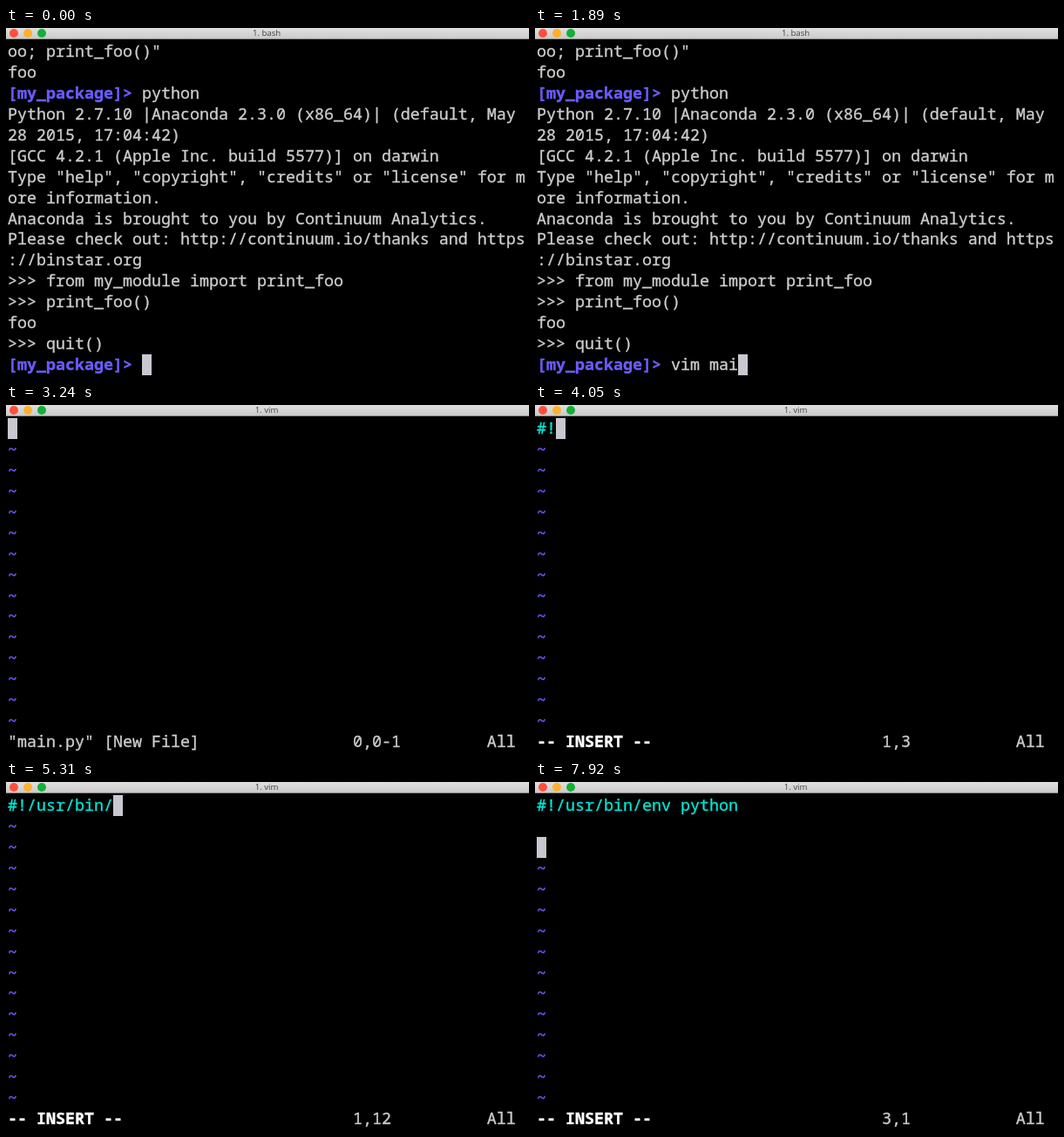
Animation of 600 by 400 pixels, one loop 8 s. Source, as an HTML page:

```html
<!DOCTYPE html>
<html lang="en">
<head>
<meta charset="utf-8">
<style>
html, body { margin: 0; width: 100%; height: 100%; overflow: hidden; background: #000; }
#stage { position: relative; width: 600px; height: 400px; overflow: hidden; background: #000; }
#bar { position: absolute; inset: 0 0 auto; height: 13px; background: linear-gradient(#e0e0e0, #cbcbcb);
  border-bottom: 1px solid #8c8c8c; box-sizing: border-box; }
#bar i { position: absolute; top: .5px; width: 10px; height: 10px; border-radius: 50%; }
#title { position: absolute; left: 0; width: 598px; top: 0; text-align: center; color: #404040;
  font: 9.6px/12px "Open Sans", "Noto Sans", sans-serif; }
#screen { position: absolute; left: 2px; top: 14px; margin: 0; color: #cdcdcd;
  font: 500 18.333px/23.93px "Noto Sans Mono", "DejaVu Sans Mono", monospace; font-variant-ligatures: none;
  -webkit-text-stroke: .35px; }
#cursor { position: absolute; width: 11px; height: 24px; background: #c9c7cf; }
.prompt { color: #6a5cff; font-weight: 600; }
.tilde { color: #6a5cff; }
.comment { color: #00e6d6; }
.mode { color: #fff; font-weight: 600; }
</style>
</head>
<body>
<div id="stage">
  <div id="bar">
    <i style="left:4px;background:#ff4f3c"></i>
    <i style="left:20px;background:#ffb02c"></i>
    <i style="left:36px;background:#12b038"></i>
    <div id="title"></div>
  </div>
  <div id="cursor"></div>
  <pre id="screen"></pre>
</div>
<script>
const LOOP = 8000, VIM = 3150, INSERT = 3510, CELL = 11, ROW = 23.93;
const [title, cursor, screen] = ['title', 'cursor', 'screen'].map(id => document.getElementById(id));

const history = `oo; print_foo()"
foo
[my_package]> python
Python 2.7.10 |Anaconda 2.3.0 (x86_64)| (default, May
28 2015, 17:04:42)
[GCC 4.2.1 (Apple Inc. build 5577)] on darwin
Type "help", "copyright", "credits" or "license" for m
ore information.
Anaconda is brought to you by Continuum Analytics.
Please check out: http://continuum.io/thanks and https
://binstar.org
>>> from my_module import print_foo
>>> print_foo()
foo
>>> quit()
[my_package]> `;

// Each burst: start time, time per key, keys
const command = [[810, 90, 'vim'], [1440, 120, ' main.py']];
const source = [[3870, 90, '#!'], [4320, 110, '/usr'], [4770, 105, '/bin/'],
  [5580, 135, 'env'], [5940, 60, ' python'], [6930, 270, '\n\n']];

const typed = (bursts, t) => bursts.map(([start, step, keys]) =>
  keys.slice(0, Math.max(0, Math.floor((t - start) / step) + 1))).join('');
const escapeText = s => s.replace(/&/g, '&amp;').replace(/</g, '&lt;').replace(/>/g, '&gt;');
const span = (name, s) => `<span class="${name}">${escapeText(s)}</span>`;

function shell(t) {
  const text = typed(command, t);
  const html = escapeText(history).replace(/\[my_package\]&gt;/g, '<span class="prompt">$&</span>');
  return { name: '1. bash', html: html + text, row: 15, col: 14 + text.length };
}

function editor(t) {
  const text = typed(source, t), lines = text.split('\n');
  const row = lines.length - 1, col = lines[row].length;
  const insert = t >= INSERT;
  const body = Array.from({ length: 15 }, (_, i) =>
    i <= row ? span('comment', lines[i]) : span('tilde', '~'));
  const left = insert ? '-- INSERT --' : '"main.py" [New File]';
  const place = text ? `${row + 1},${col + 1}` : insert ? '0,1' : '0,0-1';
  const status = (insert ? span('mode', left) : left) + ' '.repeat(36 - left.length) + place.padEnd(14) + 'All';
  return { name: '1. vim', html: [...body, status].join('\n'), row, col };
}

let shown = '';
function draw(now) {
  const t = now % LOOP;
  const view = t < VIM ? shell(t) : editor(t);
  if (view.html !== shown) {
    screen.innerHTML = shown = view.html;
    title.textContent = view.name;
    cursor.style.left = 2 + view.col * CELL + 'px';
    cursor.style.top = Math.round(15 + view.row * ROW) + 'px';
  }
  requestAnimationFrame(draw);
}
draw(performance.now());
</script>
</body>
</html>
```
